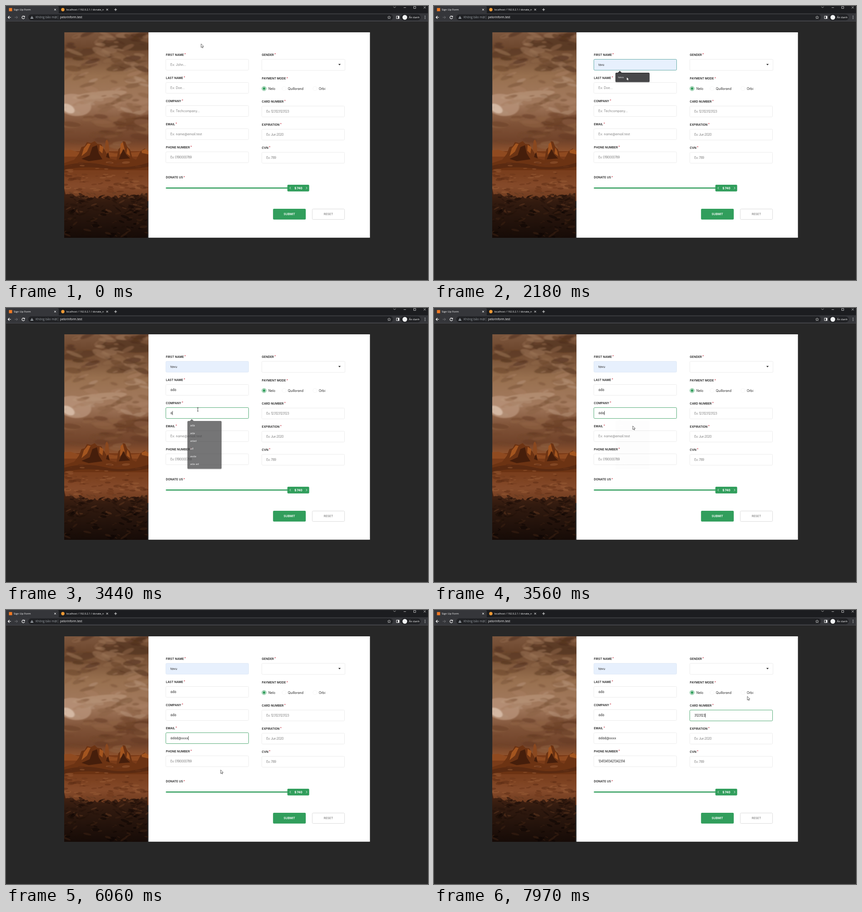
These frames come from a looping animation (928 by 604 pixels, 7.99 s). An HTML page:

```html
<!DOCTYPE html>
<html lang="en">
<head>
<meta charset="utf-8">
<title>Sign Up Form</title>
<style>
  html, body { margin: 0; width: 100%; height: 100%; overflow: hidden; background: #272727; }
  svg { display: block; width: 100vw; height: 100vh; }
  text { white-space: pre; }
  .form { font: 7px Inter, "Open Sans", sans-serif; font-feature-settings: "cv11"; fill: #222; }
  .form .label { font-size: 6.5px; font-weight: 600; }
  .form .star { fill: #c01c2e; font-size: 6px; }
  .form .hint { fill: #808080; }
  .form .num { letter-spacing: -.5px; }
  .form .btn { font-size: 6.5px; font-weight: 600; text-anchor: middle; }
  .ui { font: 6px "Open Sans", "Noto Sans", sans-serif; fill: #fff; }
  .line { fill: none; stroke: #fff; stroke-width: .9; }
</style>
</head>
<body>
<svg id="stage" viewBox="0 0 928 604" preserveAspectRatio="none">
  <defs>
    <linearGradient id="sky" x2="0" y2="1">
      <stop offset="0" stop-color="#7d573e"/><stop offset=".13" stop-color="#6d472e"/>
      <stop offset=".36" stop-color="#98704f"/><stop offset=".58" stop-color="#a37a5e"/>
      <stop offset=".76" stop-color="#7f5237"/><stop offset=".9" stop-color="#71432a"/>
      <stop offset="1" stop-color="#93552f"/>
    </linearGradient>
    <linearGradient id="land" x2="0" y2="1">
      <stop offset="0" stop-color="#7a3a17"/><stop offset=".45" stop-color="#7a3f1e"/>
      <stop offset=".7" stop-color="#854a2a"/><stop offset="1" stop-color="#6a381d"/>
    </linearGradient>
    <linearGradient id="soil" x2="0" y2="1">
      <stop offset="0" stop-color="#4a2614"/><stop offset=".3" stop-color="#311a0f"/>
      <stop offset="1" stop-color="#160b07"/>
    </linearGradient>
    <filter id="soft" x="-10%" y="-10%" width="120%" height="120%"><feGaussianBlur stdDeviation="1.6 .9"/></filter>
    <clipPath id="frame"><path d="M128.300 58H313.500V511H128.300Z"/></clipPath>
    <clipPath id="tabClip"><path d="M130 0H215V16H130Z"/></clipPath>
  </defs>

  <!-- browser bar -->
  <path fill="#1c1d20" d="M0 0H928V17H0Z"/>
  <path fill="#35363a" d="M0 0H113Q116 0 116 3V16H928V33.5H0Z"/>
  <path fill="#4a4b4e" d="M0 33H928V34H0Z"/>
  <rect x="49" y="18.5" width="802" height="13" rx="6.5" fill="#202124"/>
  <rect x="868" y="18.5" width="44" height="13" rx="6.5" fill="#202124"/>
  <rect x="6.5" y="4.5" width="7" height="7" fill="#f27a24"/>
  <circle cx="125" cy="8" r="3.7" fill="#ee9a35"/>
  <g class="ui">
    <text x="17" y="10.2">Sign Up Form</text>
    <text x="132.500" y="10.2" font-size="5.700" clip-path="url(#tabClip)">localhost / 192.0.2.1 / donate_re</text>
    <text x="65" y="27.3" font-size="6.7" fill="#9aa0a6">Không bảo mật</text>
    <text x="119" y="27.3" font-size="6.4">pelorinform.test</text>
    <text x="886" y="27.1">Ẩn danh</text>
  </g>
  <g class="line">
    <path d="M106 6l4 4m0-4l-4 4M220.500 6l4 4m0-4l-4 4M238 8h6M241 5v6"/>
    <path d="M11 25H4.500M7.500 22L4.500 25L7.500 28" stroke-width="1.1"/>
    <path d="M19 25h6.500M22.500 22l3 3l-3 3" stroke="#77787b"/>
    <path d="M40.300 23.200A3 3 0 1 0 40.900 26M41 21.800V24H38.700" stroke-width="1.1"/>
    <path d="M852 1.500l2.500 2.500l2.500-2.500M874.500 3.500h5M896.500 1h4.500v4.500h-4.500ZM918.500 1l4.500 4.500m0-4.500l-4.500 4.500" stroke="#d8d8d8" stroke-width=".8"/>
    <path d="M842.500 21.800l1 2.200l2.400.2l-1.800 1.600l.6 2.400l-2.200-1.300l-2.200 1.300l.6-2.400l-1.800-1.600l2.400-.2Z" stroke="#ddd" stroke-width=".7"/>
    <path d="M858.500 22.200h6v5.600h-6Z"/>
    <path d="M114.500 21v8" stroke="#5f6368" stroke-width=".7"/>
  </g>
  <path fill="#fff" d="M861.800 22h3v6h-3Z"/>
  <path fill="#9aa0a6" fill-rule="evenodd" d="M57 21.700l3.500 6.300h-7ZM56.600 24v2h.8v-2Z"/>
  <circle cx="877" cy="25" r="5.200" fill="#f1f3f4"/>
  <g fill="#e8eaed"><circle cx="921.500" cy="22.300" r=".8"/><circle cx="921.500" cy="25" r=".8"/><circle cx="921.500" cy="27.700" r=".8"/></g>

  <!-- landscape -->
  <g clip-path="url(#frame)">
    <rect x="128" y="58" width="186" height="266" fill="url(#sky)"/>
    <g id="clouds" filter="url(#soft)"></g>
    <rect x="128" y="320" width="186" height="110" fill="url(#land)"/>
    <path fill="#8f4a20" d="M128 318l14-1l16 5l60-1l22 4l50-3l24-4v14H128Z"/>
    <path fill="#6c3313" d="M128 346l22-7l10-13l6-15l7-2l5-9l9 2l8-4l6 6l9 1l3 8l7 7l5 15l18 5l4-24l7-7l3-11l5 1l4 10l7 8l5 18l8 4l10-19l9-6l8 6v42H128Z"/>
    <path fill="#a3551f" d="M180 303l6 1l-8 17l-12 10l5-17ZM206 306l8 5l-2 14l-7-6ZM252 304l5-4l4 16l-11 12ZM267 312l4 8l2 11l-8-6ZM298 319l9-4l6 5v7l-14-3Z"/>
    <path fill="#451e0b" d="M190 311l10-4l4 18l8 13l-30 4l-16-5l18-8ZM258 315l6 12l9 9l-25 2ZM224 319l4 17l-8-3Z"/>
    <path fill="#8a481f" d="M217 318l2-20l3-4l3 6l2 20l-5 6Z"/>
    <path fill="#5a2a11" d="M128 352q45-12 90-1t96-6v9q-50 10-96 4t-90 3Z"/>
    <g id="stones"></g>
    <path id="soilShape" fill="url(#soil)"/>
    <g id="clods"></g>
  </g>

  <path fill="#fff" d="M313.300 58H800.300V510.800H313.300Z"/>
  <g class="form" id="form"></g>
  <g class="ui" id="menus"></g>
  <g id="cursor">
    <path id="arrow" d="M0 0V8L1.900 6.300L3.100 9L4.400 8.400L3.200 5.800L5.700 5.600Z" fill="#fff" stroke="#222" stroke-width=".7"/>
    <path id="beam" d="M-1.500 -3.800H1.500M0 -3.800V3.800M-1.500 3.800H1.500" fill="none" stroke="#222" stroke-width=".8"/>
  </g>
</svg>
<script>
const LOOP = 7990, GREEN = '#319e5c';
const $ = id => document.getElementById(id);
const form = $('form');

function add(parent, tag, attrs, text) {
  const el = document.createElementNS('http://www.w3.org/2000/svg', tag);
  for (const k in attrs) el.setAttribute(k, attrs[k]);
  if (text) el.textContent = text;
  parent.appendChild(el);
  return el;
}
const show = (el, o) => el.setAttribute('opacity', o);
const ramp = (t, start, len) => Math.max(0, Math.min(1, (t - start) / len));
const fade = (t, on, off, len) => ramp(t, on, len) - ramp(t, off, len);

// Landscape texture
let seed = 7;
const rnd = () => (seed = seed * 16807 % 2147483647) / 2147483647;

function blob(parent, cx, cy, rx, ry, fill, opacity, tilt = 0) {
  add(parent, 'ellipse', { cx, cy, rx, ry, fill, opacity, transform: `rotate(${tilt} ${cx} ${cy})` });
}

// Scatter blobs over a band of the picture
function scatter(parent, n, top, bottom, size, colors, opacity, tilt = 0) {
  for (let i = 0; i < n; i++) {
    const r = size * (.4 + rnd());
    blob(parent, 128 + rnd() * 186, top + rnd() * (bottom - top), r, r * (.2 + rnd() * .2),
      colors[i % colors.length], opacity, (rnd() - .5) * tilt);
  }
}

function paintLand() {
  const sky = $('clouds');
  blob(sky, 262, 84, 62, 13, '#55351f', .75, 6);
  blob(sky, 160, 104, 40, 9, '#5a3923', .7, -8);
  blob(sky, 268, 132, 48, 9, '#64412a', .6, -10);
  blob(sky, 150, 218, 38, 24, '#b8937a', .8, 10);
  blob(sky, 206, 196, 60, 8, '#b8947a', .7, -6);
  blob(sky, 280, 255, 46, 9, '#633a22', .6, -6);
  scatter(sky, 60, 60, 145, 15, ['#50311d', '#8e664a', '#6b452d', '#9a7457'], .55, 50);
  scatter(sky, 55, 145, 240, 14, ['#b39076', '#7d5639', '#a87f62', '#8b6245'], .55, 50);
  scatter(sky, 34, 240, 312, 18, ['#633a22', '#8f6244', '#74482d'], .5, 20);
  blob(sky, 137, 226, 15, 9, '#dcc3b0', .8, 30);
  scatter($('stones'), 90, 345, 412, 7, ['#5c2c14', '#985b35', '#6b3519'], .5, 10);

  let d = 'M128 511V402';
  for (let x = 131; x <= 314; x += 4) {
    d += `L${x} ${408 + 10 * Math.sin((x - 128) / 59) + rnd() * 8}`;
  }
  $('soilShape').setAttribute('d', d + 'V511Z');
  scatter($('clods'), 90, 412, 455, 6, ['#160a05', '#603820', '#23110a'], .5, 80);
  scatter($('clods'), 80, 450, 509, 7, ['#0d0603', '#3a2013', '#1c0e08'], .55, 80);
}

function label(x, y, text) {
  const el = add(form, 'text', { class: 'label', x, y: y + 2.4 }, text);
  add(el, 'tspan', { class: 'star', dx: 1.2, dy: -.8 }, '*');
}

// Typing steps: [time, text]
const spell = (word, start, gap) => [...word].map((c, i) => [start + i * gap, word.slice(0, i + 1)]);

const fields = [
  { x: 351.5, y: 117.5, name: 'FIRST NAME', hint: 'Ex: John...', on: 1600, off: 2560,
    steps: [[2130, 'tavu']], auto: 2130 },
  { x: 351.5, y: 168.5, name: 'LAST NAME', hint: 'Ex: Doe...', on: 2600, off: 3230,
    steps: [[2800, 'a'], [2900, 'ad'], [2980, 'ađ'], [3060, 'ađa'], [3200, 'áđá']] },
  { x: 351.5, y: 219.5, name: 'COMPANY', hint: 'Ex: Techcompany...', on: 3250, off: 3770,
    steps: [[3390, 'a'], [3440, 'á'], [3480, 'ád'], [3530, 'áda'], [3620, 'áđá']] },
  { x: 351.5, y: 270.5, name: 'EMAIL', hint: 'Ex: name@email.test', on: 3780, off: 6120,
    steps: [[4030, 'a'], [4080, 'á'], [4130, 'ád'], [4250, 'áda'], [4340, 'ádả'], [4430, 'ádảd'],
      [4970, 'ádảd@'], [5270, 'ádảd@x'], [5420, 'ádảd@xx'], [5570, 'ádảd@xxx'], [5690, 'ádảd@xxxx']] },
  { x: 351.5, y: 321.5, name: 'PHONE NUMBER', hint: 'Ex: 0190000789', on: 6130, off: 7390, num: 1,
    steps: spell('13413413421342314', 6560, 38) },
  { x: 562.5, y: 220.5, name: 'CARD NUMBER', hint: 'Ex: 123123123123', on: 7400, off: 9000, num: 1,
    steps: spell('3123123', 7500, 68) },
  { x: 562.5, y: 271.5, name: 'EXPIRATION', hint: 'Ex: Jun 2020', on: 9000, off: 9001, num: 1, steps: [] },
  { x: 562.5, y: 322.5, name: 'CVN', hint: 'Ex: 789', on: 9000, off: 9001, num: 1, steps: [] }
];

function box(x, y, w, h, attrs) {
  return add(form, 'rect', { x, y, width: w, height: h, rx: 2, fill: 'none', ...attrs });
}

function buildForm() {
  for (const f of fields) {
    label(f.x, f.y - 10.2, f.name);
    f.base = box(f.x, f.y, 182, 24, { stroke: '#ececec' });
    f.ring = box(f.x, f.y, 182, 24, { stroke: GREEN, 'stroke-width': .8 });
    f.text = add(form, 'text', { x: f.x + 10, y: f.y + 14.2 });
    f.caret = add(form, 'path', { stroke: '#222', 'stroke-width': .8 });
  }
  label(562.5, 107.3, 'GENDER');
  box(562.5, 117.5, 183, 24.5, { stroke: '#ececec' });
  add(form, 'path', { d: 'M730.800 127.800H736L733.400 130.800Z' });
  label(562.5, 160, 'PAYMENT MODE');
  [['Nelo', 567.5, 577], ['Quillorand', 611.5, 620], ['Orbi', 679.5, 688]].forEach(([name, cx, x], i) => {
    add(form, 'circle', { cx, cy: 182, r: 4.6, fill: 'none', stroke: i ? '#f5f5f5' : GREEN, 'stroke-width': .9 });
    if (!i) add(form, 'circle', { cx, cy: 182, r: 2.9, fill: GREEN });
    add(form, 'text', { x, y: 184.500 }, name);
  });
  label(351.5, 378, 'DONATE US');
  add(form, 'rect', { x: 351.5, y: 400, width: 270, height: 2.4, rx: 1.2, fill: GREEN });
  box(618.7, 394, 48, 14.7, { fill: GREEN });
  add(form, 'path', { class: 'line', d: 'M626.200 399l-2.200 2.300l2.200 2.300M659.800 399l2.200 2.300l-2.200 2.300' });
  const price = add(form, 'text', { class: 'btn', x: 643, y: 403.800, fill: '#fff', style: 'font-weight:700' }, '$');
  add(price, 'tspan', { dx: .8 }, '740');
  box(587.2, 447, 72, 23.8, { fill: GREEN });
  add(form, 'text', { class: 'btn', x: 623.2, y: 461.200, fill: '#fff' }, 'SUBMIT');
  box(673.5, 447.5, 71, 23, { stroke: '#dcdcdc' });
  add(form, 'text', { class: 'btn', x: 709, y: 461.200, fill: '#8f8f8f' }, 'RESET');
}

// Suggestion lists
const menus = [
  { x: 399, y: 147, w: 75, on: 1620, off: 2380, rows: ['tavu'] },
  { x: 399, y: 198, w: 75, on: 2620, off: 2800, rows: ['áđá'] },
  { x: 399, y: 249, w: 75, on: 3260, off: 3390, len: 172, rows: ['áđá', 'ada', 'adad', 'áđ', 'asda', 'ada ad'] },
  { x: 400, y: 300, w: 78, on: 3790, off: 4030, cut: 1,
    rows: ['ada@zmail.test', 'áđá', 'adad', 'ad@zmail.test', 'orumadel', 'asda'] },
  { x: 400, y: 300, w: 78, on: 4029, off: 4065, len: 150, snap: 1, rows: ['orumadel@zmail.test', 'orumadel'] }
];

function buildMenus() {
  for (const m of menus) {
    m.g = add($('menus'), 'g', {});
    const h = 3.5 + 17 * m.rows.length;
    add(m.g, 'rect', { x: m.x - .5, y: m.y + .5, width: m.w + 1, height: h + 1, rx: 2.5, fill: '#000', opacity: .18 });
    add(m.g, 'path', { d: `M${m.x + 5} ${m.y + .3}l4.500 -4.500l4.500 4.500Z`, fill: '#3b3b3d' });
    add(m.g, 'rect', { x: m.x, y: m.y, width: m.w, height: h, rx: 2, fill: '#3b3b3d' });
    m.hot = add(m.g, 'rect', { x: m.x, y: m.y + 2, width: m.w, height: 17, fill: '#48484a' });
    m.rows.forEach((s, i) => add(m.g, 'text', { x: m.x + 6, y: m.y + 12.3 + 17 * i }, s));
  }
}

// Pointer path: [time, x, y]
const path = [
  [0, 429, 83.5], [870, 429, 83.5], [1360, 420, 121], [1600, 420, 121], [1700, 421, 119],
  [2100, 421, 119], [2175, 423.5, 156.5], [2380, 423.5, 156.5], [2560, 423, 180], [2890, 423, 180],
  [3090, 421.5, 221.5], [3170, 421.5, 223], [3430, 421.5, 223], [3560, 437, 260], [3740, 469.5, 287],
  [5870, 469.5, 287], [6060, 472, 352.5], [6085, 473, 358], [6130, 476, 336], [6920, 476, 336],
  [7290, 609, 232], [7560, 609, 232], [7930, 689, 190.5], [LOOP, 689, 190.5]
];

function pointer(t) {
  let i = 1;
  while (i < path.length - 1 && path[i][0] < t) i++;
  const [t0, x0, y0] = path[i - 1], [t1, x1, y1] = path[i];
  const k = ramp(t, t0, t1 - t0), e = k * k * (3 - 2 * k);
  return [x0 + (x1 - x0) * e, y0 + (y1 - y0) * e];
}

function drawField(f, t) {
  let value = '';
  for (const [at, s] of f.steps) if (t >= at) value = s;
  const preview = f.auto && t < 2380;
  const text = value || f.hint;
  if (f.text.textContent !== text) f.text.textContent = text;
  f.text.setAttribute('class', (value ? '' : 'hint') + (f.num ? ' num' : ''));
  f.text.style.fontSize = preview && value ? '6.2px' : '';
  const filled = f.auto && t >= f.auto;
  f.base.setAttribute('fill', filled ? '#e7f0fd' : '#fff');
  f.base.setAttribute('stroke', filled ? '#e0eaf6' : '#ececec');
  f.ring.setAttribute('stroke', filled ? '#4a9d96' : GREEN);
  show(f.ring, fade(t, f.on, f.off, 110));
  const live = t >= f.on && t < f.off && !(preview && value);
  const x = f.x + 10.4 + (value ? f.text.getComputedTextLength() : 0);
  f.caret.setAttribute('d', `M${x} ${f.y + 7.5}v9`);
  show(f.caret, live ? 1 : 0);
}

function drawMenu(m, t) {
  const enter = ramp(t, m.on, m.snap ? 1 : 110);
  const leave = ramp(t, m.off, m.cut ? 1 : m.len || 180);
  show(m.g, enter * (1 - leave));
  show(m.hot, m === menus[0] && t > 2130 ? 1 : 0);
}

function draw(t) {
  fields.forEach(f => drawField(f, t));
  menus.forEach(m => drawMenu(m, t));
  const [x, y] = pointer(t);
  const inside = fields.some(f => x > f.x && x < f.x + 182 && y > f.y && y < f.y + 24);
  $('cursor').setAttribute('transform', `translate(${x} ${y})`);
  show($('arrow'), inside ? 0 : 1);
  show($('beam'), inside ? 1 : 0);
}

paintLand();
buildForm();
buildMenus();
const start = performance.now();
function tick() {
  draw((performance.now() - start) % LOOP);
  requestAnimationFrame(tick);
}
draw(0);
requestAnimationFrame(tick);
</script>
</body>
</html>
```
